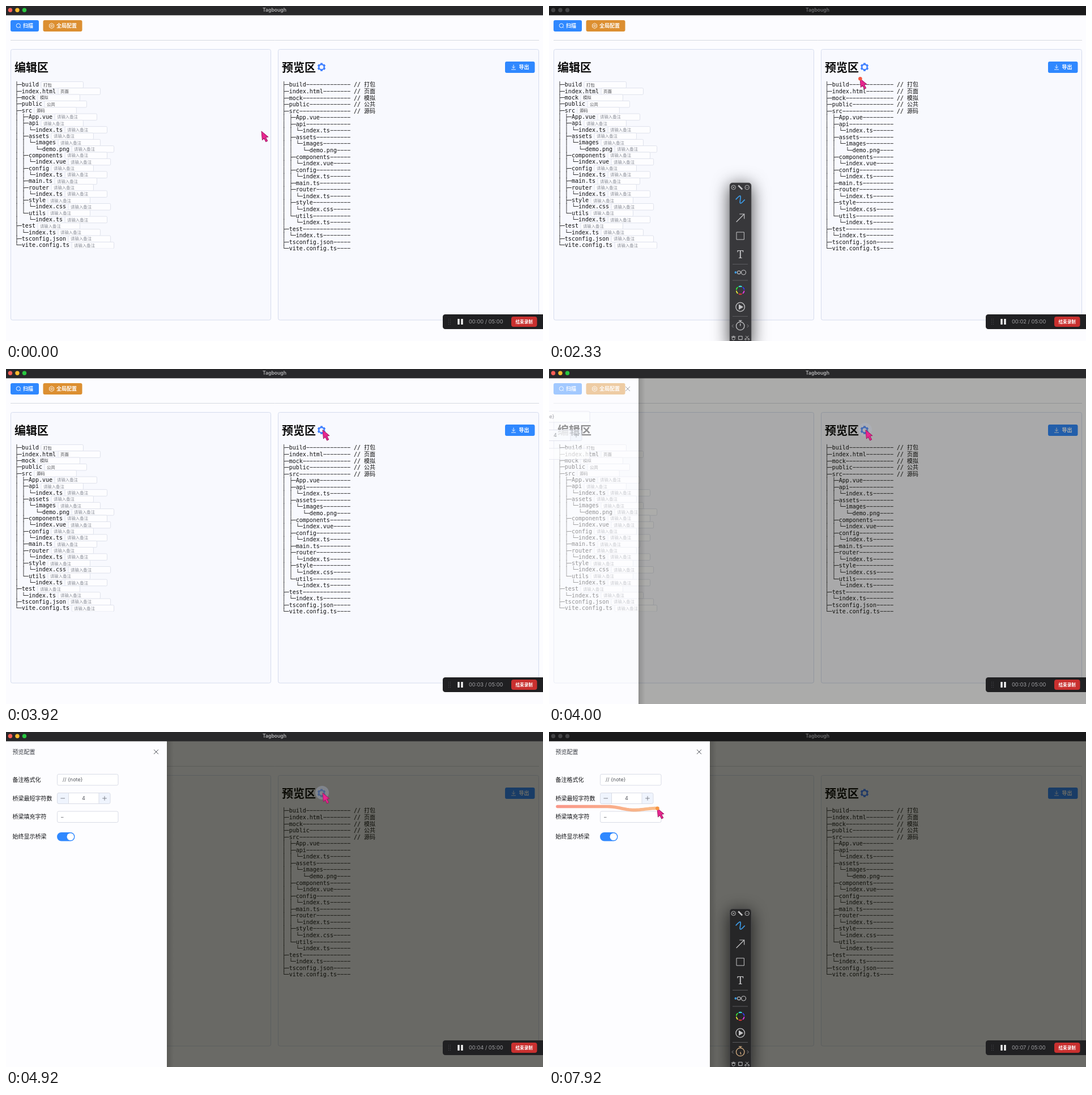
Write an HTML page with a canvas that moves like this. It is 948 by 591 pixels and loops after 8 s.

```html
<!DOCTYPE html>
<html lang="zh-CN">
<head>
<meta charset="utf-8">
<title>Tagbough</title>
<style>
html, body { margin: 0; width: 100%; height: 100%; overflow: hidden; background: #fcfcff; }
canvas { display: block; width: 948px; height: 591px; }
</style>
</head>
<body>
<canvas id="stage"></canvas>
<script>
const W = 948, H = 591, LOOP = 8000, STEP = 1000 / 12, TAU = Math.PI * 2;
const CJK = '"Noto Sans CJK SC", "Noto Sans CJK", sans-serif';
const SANS = 'Inter, ' + CJK;
const MONO = '"DejaVu Sans Mono", ' + CJK.replace('sans-serif', 'monospace');
const BLUE = '#2f88ff', BORDER = '#d9dce6', ICON = '#c4c4c6';

const canvas = document.getElementById('stage');
const dpr = window.devicePixelRatio || 1;
canvas.width = W * dpr;
canvas.height = H * dpr;
const c = canvas.getContext('2d');

// ---------- helpers ----------
const ramp = (t, a, b) => Math.max(0, Math.min(1, (t - a) / (b - a)));
const smooth = p => p * p * (3 - 2 * p);
const mix = (a, b, p) => a + (b - a) * p;

function text(s, x, y, size, color, weight = 400, font = CJK, align = 'left') {
  c.font = `${weight} ${size}px ${font}`;
  c.textAlign = align;
  c.fillStyle = color;
  c.fillText(s, x, y + size * (font === CJK ? .38 : .36));
}
function box(x, y, w, h, r, fill, stroke) {
  c.beginPath();
  c.roundRect(x, y, w, h, r);
  paint(fill, stroke);
}
function paint(fill, stroke, width = 1) {
  if (fill) { c.fillStyle = fill; c.fill(); }
  if (stroke) { c.strokeStyle = stroke; c.lineWidth = width; c.stroke(); }
}
function disc(x, y, r, fill) {
  c.beginPath();
  c.arc(x, y, r, 0, TAU);
  paint(fill);
}
function ring(x, y, r, color, width = 1, a = 0, b = TAU) {
  c.beginPath();
  c.arc(x, y, r, a, b);
  paint(null, color, width);
}
function line(x1, y1, x2, y2, color, width = 1) {
  c.beginPath();
  c.moveTo(x1, y1);
  c.lineTo(x2, y2);
  paint(null, color, width);
}
// f maps 0..1 to a point
function plot(f, n, color, width) {
  c.beginPath();
  for (let i = 0; i <= n; i++) c.lineTo(...f(i / n));
  paint(null, color, width);
}
// regular polygon
const polygon = (x, y, r, n, turn) =>
  u => [x + r * Math.cos(u * TAU + turn), y + r * Math.sin(u * TAU + turn)];
// V shape with its point at x, y; (dx, dy) is the way it points
function chevron(x, y, dx, dy, color, width) {
  plot(u => {
    const s = 2 * u - 1, b = Math.abs(s);
    return [x - dx * b - dy * s, y - dy * b + dx * s];
  }, 2, color, width);
}
function cross(x, y, r, color, width) {
  line(x - r, y - r, x + r, y + r, color, width);
  line(x + r, y - r, x - r, y + r, color, width);
}

// ---------- file tree ----------
const rows = ('build|index.html|mock|public|src|>App.vue|>api|>>index.ts|>assets|>>images|>>>demo.png|' +
  '>components|>>index.vue|>config|>>index.ts|>main.ts|>router|>>index.ts|>style|>>index.css|' +
  '>utils|>>index.ts|test|>index.ts|tsconfig.json|vite.config.ts').split('|').map(s => {
    const name = s.replace(/^>+/, '');
    return { name, depth: s.length - name.length };
  });
const notes = ['打包', '页面', '模拟', '公共', '源码'];
rows.forEach((row, i) => {
  const goesOn = level => {
    const next = rows.slice(i + 1).find(r => r.depth <= level);
    return !!next && next.depth === level;
  };
  let s = '';
  for (let l = 0; l < row.depth; l++) s += goesOn(l) ? '│ ' : '  ';
  row.label = s + (goesOn(row.depth) ? '├─' : '└─') + row.name;
});

function editTree() {
  c.save();
  c.beginPath();
  c.rect(8, 130, 460, 298);
  c.clip();
  rows.forEach((row, i) => {
    const y = 138.8 + i * 11.32, x = 19.8 + row.label.length * 6.02;
    box(x, y - 5.4, 74.5, 11.6, 2, '#fdfdff', '#dfe2ec');
    text(notes[i] || '请输入备注', x + 4, y + .2, 7.4, notes[i] ? '#404247' : '#868a94');
  });
  rows.forEach((row, i) => text(row.label, 15.8, 138.8 + i * 11.32, 10, '#111', 400, MONO));
  c.restore();
}
function previewTree() {
  rows.forEach((row, i) => {
    const s = row.label + '−'.repeat(20 - row.label.length) + (notes[i] ? ' // ' + notes[i] : '');
    text(s, 487.6, 138.8 + i * 11.56, 10, '#111', 400, MONO);
  });
}

// ---------- page ----------
function gear(x, y) {
  ring(x, y, 4.7, '#4080ff', 2.4);
  for (let a = 0; a < TAU - .1; a += TAU / 6) {
    const dx = Math.sin(a), dy = Math.cos(a);
    line(x + dx * 4.5, y + dy * 4.5, x + dx * 7.2, y + dy * 7.2, '#4080ff', 3.8);
  }
}
function button(x, y, w, label, labelX, color) {
  box(x, y, w, 20, 3, color);
  text(label, x + labelX, y + 10, 9, '#fff', 700);
}
function page() {
  c.fillStyle = '#fcfcff';
  c.fillRect(0, 0, W, H);

  button(8, 25, 50, '扫描', 22, BLUE);
  ring(21.8, 34.6, 3.6, '#fff', .9);
  line(24.4, 37.2, 26, 38.8, '#fff', .9);

  button(65.5, 25, 69, '全局配置', 23.5, '#dc8f31');
  plot(polygon(80.5, 35, 4.6, 6, TAU / 12), 6, '#fff', .9);
  ring(80.5, 35, 1.7, '#fff', .9);

  line(8, 60.5, 941, 60.5, '#d6d9e0');
  box(8.5, 76.5, 459, 477.5, 3, '#f8f9fe', '#d5dcee');
  box(480.5, 76.5, 460, 477.5, 3, '#f8f9fe', '#d5dcee');
  text('编辑区', 15, 108, 20, '#0a0a0a', 700);
  text('预览区', 487, 108, 20, '#0a0a0a', 700);
  gear(557, 107.7);

  button(881, 98, 52.5, '导出', 24.5, BLUE);
  line(896, 103.5, 896, 109.5, '#fff', .9);
  chevron(896, 109.7, 0, 2.7, '#fff', .9);
  line(892, 112, 900, 112, '#fff', .9);

  editTree();
  previewTree();
}

function titleBar(dim) {
  c.fillStyle = dim ? '#19191a' : '#28282a';
  c.fillRect(0, 0, W, 16.4);
  ['#ff5f57', '#febc2e', '#28c840'].forEach((col, i) =>
    disc(7.5 + i * 12.5, 7.2, 3.7, dim ? '#434345' : col));
  text('Tagbough', 474, 7.2, 8.6, dim ? '#6c6c6e' : '#b6b6b8', 600, SANS, 'center');
}

// ---------- settings drawer ----------
function field(y, value) {
  box(90.5, y - 9.7, 107.5, 19.5, 2.5, '#fff', BORDER);
  text(value, 100, y, 9, '#55585f', 400, SANS);
}
function drawer(p) {
  if (p <= 0) return;
  const edge = 284 * p, ink = '#73777f';
  c.fillStyle = `rgba(10,10,0,${.6 * p})`;
  c.fillRect(edge, 16, W - edge, H - 16);
  const shade = c.createLinearGradient(edge, 0, edge + 12, 0);
  shade.addColorStop(0, 'rgba(0,0,0,.16)');
  shade.addColorStop(1, 'rgba(0,0,0,0)');
  c.fillStyle = shade;
  c.fillRect(edge, 16, 12, H);

  c.save();
  c.globalAlpha = p;
  c.translate(edge - 284, 0);
  c.fillStyle = '#fdfdff';
  c.fillRect(0, 16, 284, H);
  text('预览配置', 11.5, 35, 10, '#3c3f46', 500);
  cross(265, 35, 4, '#55585f');
  ['备注格式化', '桥梁最短字符数', '桥梁填充字符', '始终显示桥梁'].forEach((s, i) =>
    text(s, 11.5, 84 + i * 32.7 + (i > 2 ? 2.4 : 0), 10, '#101114', 500));

  field(84.2, '// {note}');
  field(149.7, '');
  text('–', 97, 149.7, 9, '#55585f', 400, SANS);

  box(90.5, 107.5, 93.5, 19, 2.5, '#eff4fd', BORDER);
  box(110.5, 107.5, 53.5, 19, 0, '#fff', BORDER);
  line(96.4, 117, 104, 117, ink, .9);
  line(170.2, 117, 177.8, 117, ink, .9);
  line(174, 113.2, 174, 120.8, ink, .9);
  text('4', 137, 117, 9, '#55585f', 400, SANS, 'center');

  box(90, 177, 31.5, 15.5, 7.75, BLUE);
  disc(113.8, 184.75, 6.3, '#fff');
  c.restore();
}

function recorder(t) {
  box(771, 544, 182, 26, 4.5, '#202022');
  for (let i = 0; i < 8; i++) disc(781.5 + (i % 2) * 3, 552.5 + (i >> 1) * 3, .6, '#55555a');
  for (const x of [797.3, 803.3]) box(x, 552, 3.4, 10, .6, '#f4f4f4');
  const sec = Math.max(0, Math.floor((t - 120) / 1000));
  text(`00:0${sec} / 05:00`, 817, 557, 9.3, '#a0a0a3', 400, SANS);
  box(892, 548, 45.5, 18, 4, '#c9302f');
  text('结束录制', 914.7, 557, 7.6, '#fff', 700, CJK, 'center');
}

// ---------- drawing palette ----------
function shadowAround(x, y, w, h) {
  c.save();
  c.beginPath();
  c.rect(0, 0, W, H);
  c.roundRect(x, y, w, h, 5);
  c.clip('evenodd');
  c.shadowColor = 'rgba(0,0,0,.75)';
  c.shadowBlur = 30 * dpr;
  c.shadowOffsetY = 4 * dpr;
  box(x, y, w, h, 5, '#000');
  c.restore();
}
function stopwatch(x, y, color, angle) {
  ring(x, y, 7.2, color, 1.3);
  line(x - 2.7, y - 9.5, x + 2.7, y - 9.5, color, 1.3);
  line(x, y - 9.5, x, y - 7, color, 1.3);
  line(x, y, x + 4.5 * Math.sin(angle), y - 4.5 * Math.cos(angle), color, 1.3);
  for (const d of [-1, 1]) chevron(x + d * 14.6, y, d * 2.5, 0, '#8d8d90');
}
function palette(alpha, t) {
  if (alpha <= 0) return;
  const x = 337.7;
  c.save();
  c.globalAlpha = alpha;
  shadowAround(319, 312, 38, 290);
  box(319, 312, 38, 290, 5, 'rgba(28,28,30,.87)', 'rgba(90,90,94,.6)');

  // close, pin, more
  for (const d of [-12, 12]) ring(x + d, 320, 3.8, ICON, .9);
  cross(x - 12, 320, 1.5, ICON, .9);
  for (let i = -1; i < 2; i++) disc(x + 12 + i * 1.8, 320, .5, ICON);
  line(x - 3.5, 316.5, x + 3.5, 323.5, ICON, 2.6);

  // pen, arrow, rectangle, letter
  plot(u => {
    const s = 2 * u - 1, w = Math.sin(Math.PI * s);
    return [x + 8 * s - 3.5 * w, 341.5 + 6.5 * w];
  }, 30, '#3d9be6', 1.7);
  line(x - 7, 381, x + 7, 367, ICON, 1.2);
  c.beginPath();
  c.moveTo(x - 1.5, 367);
  c.lineTo(x + 7, 367);
  c.lineTo(x + 7, 375.5);
  paint(null, ICON, 1.2);
  box(x - 6.7, 399, 13.4, 13, 0, null, ICON);
  text('T', x, 438, 19, ICON, 300, '"Noto Serif", serif', 'center');

  for (const y of [455.5, 484, 547.5]) line(324, y, 351, y, '#66666a', .8);

  // width, colour, play
  disc(x - 8.2, 470, 2, '#3d9be6');
  ring(x - 2.4, 470, 2.8, ICON, 1.1);
  ring(x + 5.8, 470, 4, ICON, 1.1);
  for (let i = 0; i < 6; i++)
    ring(x, 501.5, 7, `hsl(${i * 60 + 300},85%,58%)`, 1.8, i * TAU / 6 + .12, (i + 1) * TAU / 6 - .12);
  ring(x, 531, 7.8, ICON, 1.3);
  plot(polygon(x, 531, 5.4, 3, 0), 3);
  paint(ICON);

  const fading = t > 7000;
  stopwatch(x, 564.5, fading ? '#d9b184' : ICON, fading ? (t - 7000) / 2000 * TAU : 0);

  // hand, selection, scissors
  ring(x - 12, 586.5, 2.7, ICON, .9);
  for (let i = -2; i < 3; i++)
    line(x - 12 + i, 585, x - 12 + i * 1.9, 581.3 + Math.abs(i) * .8, ICON, .9);
  box(x - 3, 582.5, 6.4, 6, 0, null, ICON);
  cross(x + 12, 584.5, 2.6, ICON, .9);
  for (const d of [-2.8, 2.8]) ring(x + 12 + d, 588, 1.3, ICON, .8);
  c.restore();
}

// ---------- pointer and pen ----------
const moves = [
  { from: 1830, to: 2300, x: 549, y: 128 },
  { from: 2420, to: 2830, x: 574, y: 128, pen: [3100, 3330] },
  { from: 3300, to: 3700, x: 559, y: 107.5 },
  { from: 5080, to: 5420, x: 105, y: 82 },
  { from: 5420, to: 5750, x: 15, y: 131.5 },
  { from: 6250, to: 6920, x: 191, y: 134.5, sag: 4.5, pen: [7000, 8900] }
];
function pointer(t) {
  let x = 451, y = 221;
  for (const m of moves) {
    const p = smooth(ramp(t, m.from, m.to));
    const dip = (m.sag || 0) * Math.sin(Math.PI * smooth(ramp(p, .5, 1)));
    x = mix(x, m.x, p);
    y = (m.sag ? mix(y, m.y, smooth(ramp(p, .5, 1))) : mix(y, m.y, p)) + dip;
  }
  return [x, y];
}
const ink = p => `hsl(${mix(8, 28, p)},92%,61%)`;

// a pen stroke lasts until the second time in pen
function drawStroke(m, t) {
  if (t <= m.from || t >= m.pen[1]) return;
  const end = Math.min(t, m.to);
  const grad = c.createLinearGradient(pointer(m.from)[0], 0, pointer(end)[0] + .1, 0);
  grad.addColorStop(0, ink(0));
  grad.addColorStop(1, ink(ramp(t, m.from, m.to)));
  c.save();
  c.globalAlpha = 1 - .8 * ramp(t, ...m.pen);
  c.lineCap = c.lineJoin = 'round';
  plot(u => pointer(mix(m.from, end, u)), 60, grad, 5.6);
  c.restore();
}
// symmetric arrow, leaning left
function arrow([x, y]) {
  const side = [[5.9, 14.4], [1.7, 13], [1.7, 20]];
  c.save();
  c.translate(x, y);
  c.rotate(-.48);
  c.beginPath();
  c.moveTo(0, 0);
  side.forEach(([a, b]) => c.lineTo(a, b));
  [...side].reverse().forEach(([a, b]) => c.lineTo(-a, b));
  c.closePath();
  c.lineJoin = 'round';
  paint('#e8268f', '#9c1762', .9);
  c.restore();
}

// ---------- timeline ----------
function draw(t) {
  c.setTransform(dpr, 0, 0, dpr, 0, 0);
  const tool = ramp(t, 1900, 2080) - ramp(t, 3250, 3400) + ramp(t, 5080, 5250);
  const open = 1 - (1 - ramp(t, 3917, 4207)) ** 2.41;
  const pos = pointer(t), pens = moves.filter(m => m.pen);
  page();
  drawer(open);
  if (t < 5080) disc(558, 107, 12, `rgba(190,205,240,${.28 * open})`);
  titleBar(tool > 0);
  palette(tool, t);
  recorder(t);
  pens.forEach(m => drawStroke(m, t));
  arrow(pos);
  if (tool > 0) {
    const m = pens.find(m => t < m.pen[1] + 100);
    disc(pos[0] + .4, pos[1] + .2, 3.3, ink(ramp(t, m.from, m.to)));
  }
}

// the picture advances 12 times per second
const start = performance.now();
function frame(now) {
  const t = Math.max(0, now - start) % LOOP;
  draw(Math.floor((t + 4) / STEP) % 96 * STEP);
  requestAnimationFrame(frame);
}
draw(0);
requestAnimationFrame(frame);
</script>
</body>
</html>
```
